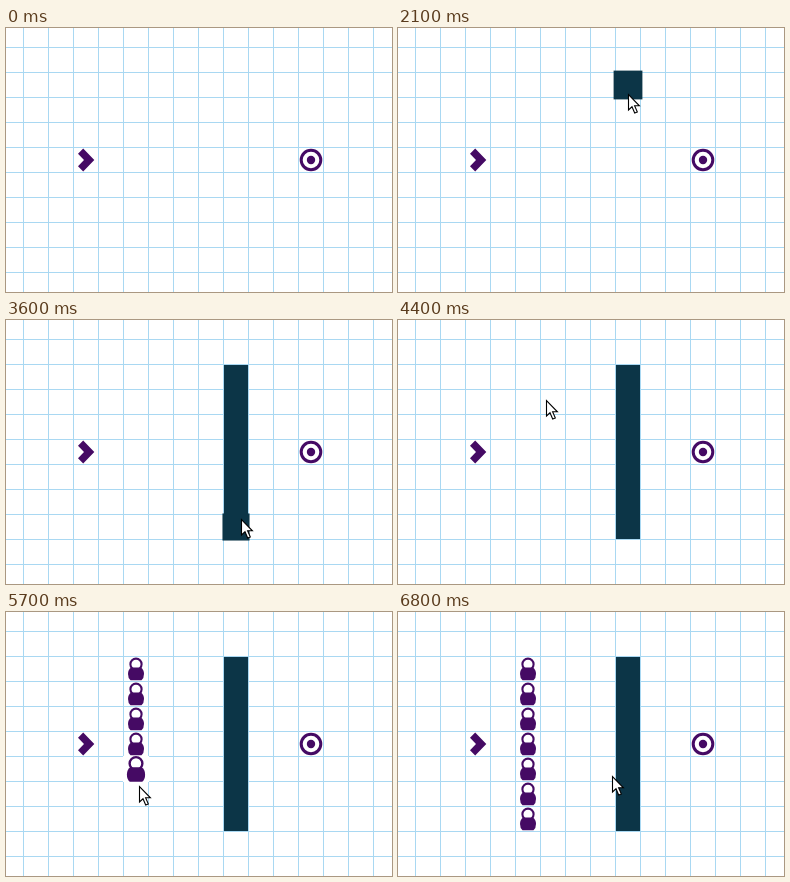
Write an HTML page with a canvas that moves like this. It is 386 px wide and 264 px high and loops after 6900 ms.

```html
<!DOCTYPE html>
<html lang="en">
<head>
<meta charset="utf-8">
<title>Drawing walls and weights on a grid</title>
<style>
  html, body { margin: 0; width: 100%; height: 100%; overflow: hidden; background: #fff; }
  canvas { display: block; width: 386px; height: 264px; }
</style>
</head>
<body>
<canvas id="stage" width="386" height="264"></canvas>
<script>
const ctx = document.getElementById('stage').getContext('2d');
const W = 386, H = 264, CELL = 25, TOP = 44, ROWS = 7;
const LOOP = 6900, STEP = 100, POP = 300;
const LINE = '#a9d8f2', WALL = '#0c3547', PURPLE = '#450a64';

// Key points of the pointer tip, joined by a smooth curve
const keys = [
  { t: 600, x: 355, y: 252 },
  { t: 1200, x: 243, y: 124 },
  { t: 1500, x: 228, y: 76 },
  { t: 1800, x: 230, y: 59 },
  { t: 2100, x: 230, y: 66 },
  { t: 2550, x: 230, y: 91 },
  { t: 2800, x: 230, y: 130 },
  { t: 3450, x: 234, y: 203 },
  { t: 3600, x: 235, y: 199 },
  { t: 4000, x: 181, y: 129 },
  { t: 4700, x: 131, y: 56 },
  { t: 5100, x: 132, y: 80 },
  { t: 5400, x: 133, y: 130 },
  { t: 5700, x: 133, y: 174 },
  { t: 6100, x: 132, y: 202 },
  { t: 6500, x: 132, y: 203 },
  { t: 6800, x: 214, y: 164 }
];

const weightBody = new Path2D('M-5-1.5Q-8 .5-8 5Q-8 9-5.5 11.3H5.5Q8 9 8 5Q8 .5 5-1.5Z');
const arrow = new Path2D('M.5.5V16L4 12.8 6.7 19 9.3 17.9 6.6 11.8H11.4Z');
const chevron = new Path2D('M77.2 120.6L88.3 132 77.2 143.4 72 138.3 78 132 72 125.7Z');

const easeOut = q => 1 - (1 - q) ** 2;

function slope(i, axis) {
  const a = keys[Math.max(0, i - 1)];
  const b = keys[Math.min(keys.length - 1, i + 1)];
  return (b[axis] - a[axis]) / (b.t - a.t);
}

function pointerAt(t, axis) {
  const i = Math.max(1, keys.findIndex(k => k.t >= t));
  const a = keys[i - 1], b = keys[i];
  const span = b.t - a.t, q = (t - a.t) / span;
  const blend = q * q * (3 - 2 * q);
  return a[axis] + (b[axis] - a[axis]) * blend
    + slope(i - 1, axis) * span * q * (1 - q) ** 2
    - slope(i, axis) * span * q * q * (1 - q);
}

// Each cell starts when the pressed pointer is a little way into its row
function dragStarts(pressed) {
  const starts = [];
  for (let t = pressed; t < LOOP && starts.length < ROWS; t += 5) {
    if (pointerAt(t, 'y') >= TOP + 6 + starts.length * CELL) starts.push(t);
  }
  return starts;
}

const wallStarts = dragStarts(1950);
const weightStarts = dragStarts(4760);

// Grows past full size, then settles
function popScale(age) {
  const half = POP / 2;
  if (age >= POP) return 1;
  return age < half
    ? 0.3 + 0.9 * easeOut(age / half)
    : 1.2 - 0.2 * easeOut(age / half - 1);
}

function disc(x, y, r, fill, stroke, width) {
  ctx.beginPath();
  ctx.arc(x, y, r, 0, Math.PI * 2);
  if (fill) { ctx.fillStyle = fill; ctx.fill(); }
  if (stroke) { ctx.strokeStyle = stroke; ctx.lineWidth = width; ctx.stroke(); }
}

function drawGrid() {
  ctx.fillStyle = '#fff';
  ctx.fillRect(0, 0, W, H);
  ctx.fillStyle = LINE;
  for (let x = 17; x < W; x += CELL) ctx.fillRect(x, 0, 1, H);
  for (let y = 19; y < H; y += CELL) ctx.fillRect(0, y, W, 1);
}

function drawWall(row, s) {
  const size = 24 * s;
  ctx.fillStyle = WALL;
  ctx.fillRect(230 - size / 2, TOP + 13 - size / 2 + row * CELL, size, size);
}

function drawWeight(row, s) {
  ctx.save();
  ctx.translate(130, TOP + 13 + row * CELL);
  ctx.scale(s, s);
  disc(0, -4.8, 5.6, '#fff', PURPLE, 2.1);
  ctx.fillStyle = PURPLE;
  ctx.fill(weightBody);
  ctx.restore();
}

// A growing cell hides the grid lines around it
function drawColumn(starts, x, drawCell, t) {
  const begun = starts.filter(start => start <= t);
  ctx.fillStyle = '#fff';
  begun.forEach((start, row) => {
    if (t - start < POP) ctx.fillRect(x - 13, TOP + row * CELL, 26, 26);
  });
  begun.forEach((start, row) => drawCell(row, popScale(t - start)));
}

// Settled wall cells join into one bar
function drawBar(t) {
  const settled = wallStarts.filter(start => t - start >= POP).length;
  ctx.fillStyle = WALL;
  if (settled) ctx.fillRect(218, TOP + 1, 24, settled * CELL - 1);
}

function drawPointer(t) {
  if (t < keys[0].t) return;
  ctx.save();
  ctx.translate(Math.round(pointerAt(t, 'x')), Math.round(pointerAt(t, 'y')));
  ctx.fillStyle = '#fff';
  ctx.strokeStyle = '#000';
  ctx.lineWidth = 1.1;
  ctx.fill(arrow);
  ctx.stroke(arrow);
  ctx.restore();
}

function draw(t) {
  drawGrid();
  ctx.fillStyle = PURPLE;
  ctx.fill(chevron);
  disc(305, 132, 9.8, null, PURPLE, 3);
  disc(305, 132, 4.2, PURPLE);
  drawColumn(wallStarts, 230, drawWall, t);
  drawBar(t);
  drawColumn(weightStarts, 130, drawWeight, t);
  drawPointer(t);
}

const origin = performance.now();
function tick() {
  const t = (performance.now() - origin) % LOOP;
  draw(Math.floor(t / STEP) * STEP);
  requestAnimationFrame(tick);
}
tick();
</script>
</body>
</html>
```
